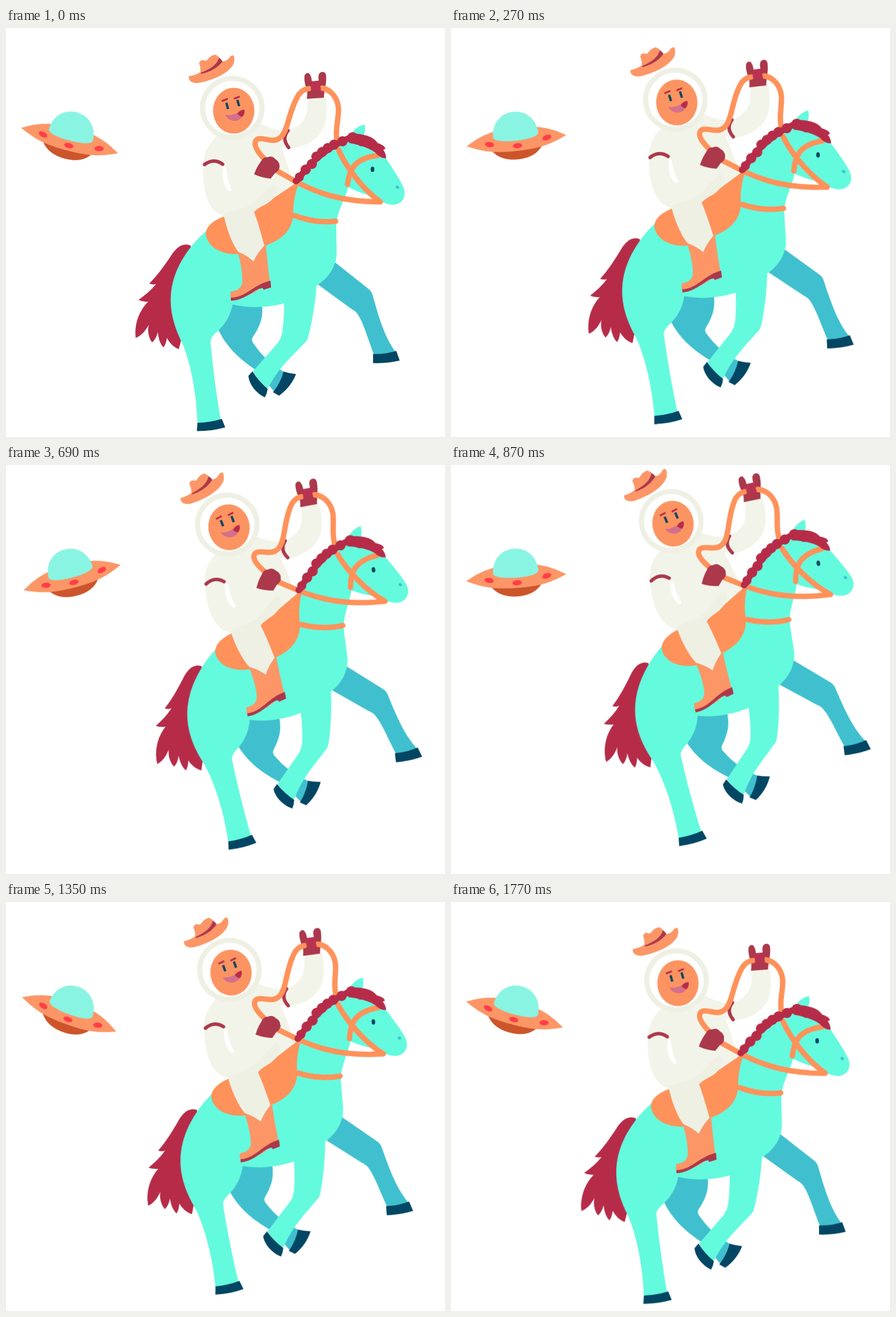
An HTML page for the animation above (1.8 s loop, 775 by 722 pixels).

```html
<!DOCTYPE html>
<html lang="en">
<head>
<meta charset="utf-8">
<title>Space rider</title>
<style>
  html, body { margin: 0; width: 100%; height: 100%; overflow: hidden; background: #fff; }
  svg { display: block; width: 100%; height: 100%; }
  #rider { transform-origin: 84px 193px; translate: -1px -0.5px; }
  .coat { fill: #64fade; }
  .far { fill: #40c0ce; }
  .navy { fill: #034663; }
  .hair { fill: #b62c48; }
  .tack { fill: #ff925a; }
  .skin { fill: #fc9666; }
  .suit { fill: #f3f4e9; }
  .pants { fill: #eef0e4; }
  .glove { fill: #ab384b; }
  .line { fill: none; stroke-linecap: round; stroke-linejoin: round; }
  .flat { fill: none; }
  .strap { stroke: #ff925a; stroke-width: 9.5; }
  .band { stroke: #ab384b; stroke-width: 6; }
</style>
</head>
<body>
<svg viewBox="0 0 775 722">
  <g id="ufo">
    <path fill="#cc552b" d="M-46 21Q-32 42 0 42Q32 42 45 21Z"/>
    <path class="skin" d="M-88.500 9C-60-8-40-14 0-14S60-8 88.500 9C60 22 40 27 0 27S-60 22-88.500 9Z"/>
    <path fill="#8af4e2" d="M-40.500-1C-39-56.500 38-56.500 40-1Q38 8.500 0 9Q-38 8.500-40.500-1Z"/>
    <g fill="#ff3d48">
      <ellipse rx="8.200" ry="4.600" transform="translate(-48 10.500) rotate(13)"/>
      <ellipse rx="8.200" ry="4.600" transform="translate(1 18)"/>
      <ellipse rx="8.200" ry="4.600" transform="translate(54 9.500) rotate(-14)"/>
    </g>
  </g>

  <g id="rider">
    <!-- tail and far legs -->
    <path class="hair" d="M326 384C311 378 300 389 292 401C280 419 268 436 253 451Q259 454 265 452C256 463 245 472 234 480Q242 484 251 483C234 500 226 525 229 547C240 543 247 533 252 524C249 537 253 549 258 555Q265 549 268 537Q270 556 278 564Q283 557 284 547Q292 562 305 567L310 548L330 450Z"/>
    <path class="far" d="M375 533L400 480L452 488C455 514 446 530 436 545Q432 551 437 557C451 578 470 596 491 607L494 625L474 643L464 630L440 603C412 584 390 564 375 533Z"/>
    <path class="navy" d="M490 606.500Q501 610 512 611Q503 634 482 649L471.500 643Q485 626 490 606.500Z"/>
    <path class="far" d="M580 413L638 459Q645 464 647 471C658 510 668 545 687 571L690 578L651 580C640 553 633 525 622 507Q618 500 610 496L551 453Z"/>
    <path class="navy" d="M648 575.500Q670 576 689 570L695 587Q672 592.500 648 591.500Z"/>

    <!-- horse -->
    <path class="coat" d="M605 195C612 180 620 174 633 170Q636 180 629 198Z"/>
    <path class="coat" d="M512 275C540 238 570 213 606 190L630 192C652 203 664 219 672 232C684 250 694 265 701 280C709 298 698 312 683 312Q669 311 660 304L655 299Q628 293 604 281C600 300 583 325 583 350C583 390 586 402 580 417C574 435 560 447 548 455C546 490 538 530 533 547Q531 553 526 557C505 580 482 598 463 635L454 636L436 606L478 558Q485 550 487 540C490 525 491 505 491 486C462 494 428 495 400 488C396 508 388 521 375 534Q361 545 361 553C365 600 372 650 379 692L379 698L338 700C337 650 327 595 312 558C290 515 289 485 292 462C298 420 325 382 357 355L440 310Z"/>
    <path class="navy" d="M435 606Q447 625 462 637Q461 645 457 652C442 645 429 629 428 614Z"/>
    <path class="navy" d="M338 697Q362 696 381 690L387 705Q362 712 337 711.500Z"/>
    <ellipse class="navy" cx="647" cy="249.500" rx="3.200" ry="4.700"/>
    <ellipse class="far" cx="691" cy="281" rx="3.200" ry="2.500" transform="rotate(40 691 281)"/>

    <!-- saddle -->
    <path class="tack" d="M387 332C360 341 349 356 354 370C361 391 386 401 412 399L458 384C486 374 506 358 507 328C507 308 510 293 518 271L480 290L440 320Z"/>
    <path class="line strap" d="M509 331Q545 345 582 341"/>

    <!-- boot -->
    <path class="skin" d="M407 390C416 415 418 440 417 450Q414 464 397 465Q395 472 397 479L432 470L466 450C463 425 460 400 459 382L430 380Z"/>
    <path class="glove" d="M397 476C424 476 436 453 467 446L468 458L455 462L453 459C438 460 425 480 397 481.500Z"/>

    <!-- suit -->
    <path class="suit" d="M375 188C355 205 348 225 348 244C346 290 358 326 386 332L440 322L507 277C500 255 494 225 480 198L452 170Z"/>
    <path class="suit" d="M448 168C468 178 484 183 497 180C520 175 532 160 532 138L534 121L564 121C568 142 567 162 560 178C548 202 520 212 497 213Q470 205 455 195Z"/>
    <path fill="#fff" d="M384 243C380 262 384 277 392 287Q398 291 398 284C392 272 389 258 389 248Z"/>
    <path class="pants" d="M384 328C388 350 398 379 410 395Q425 401 437 412Q443 398 456 384C450 362 444 340 438 325Q441 320 455 313C474 304 484 288 476 276C460 278 452 300 428 314C412 322 396 322 384 328Z"/>
    <path class="line band" d="M350.500 241Q367 229 382.500 240.500"/>
    <path class="line band" d="M498 181Q486 195 499 211"/>

    <!-- helmet and face -->
    <ellipse cx="399.500" cy="141" rx="52.500" ry="52" fill="#fff" stroke="#eef0e4" stroke-width="9"/>
    <ellipse cx="402" cy="146" rx="36.500" ry="40.500" fill="#fc9462"/>
    <path class="flat" stroke="#b62c48" stroke-width="3.200" d="M381 129L391.500 125M402.500 125L412.500 121"/>
    <path class="flat" stroke="#034663" stroke-width="4.200" d="M389 132L392 143M408.500 127L411.500 138"/>
    <path fill="#d46f8c" d="M387 153C395 156 403 152 409 150L418 153C416 160 411 164 403 164C394 163 388 158 387 153Z"/>
    <path class="hair" d="M408.500 151Q412 145 420.500 144Q423 150 417 157Q411 155 408.500 151Z"/>

    <!-- hat -->
    <path class="skin" d="M323 85C321 93 328 98 340 97C364 92 392 82 402 63Q405 50 400.500 48Q396 49 393 54C389 58 384 60 380 58Q376 49 369 47Q362 48 356 55Q354 59 349 57Q343 56 341 62Q344 70 343 78Q333 84 323 85Z"/>
    <path class="glove" d="M344 79C359 73 372 66 376 53Q380 54 382 59.500C374 70 360 78 344 81Z"/>

    <!-- hands and reins -->
    <path class="glove" d="M527 84Q530 78 535 80Q539 84 540 94L552 93Q550 80 556 78Q563 76 565 83Q566 97 563 106L561 123L531 125Q533 112 530 106Q526 95 527 84Z"/>
    <path class="line strap" d="M455 230C443 217 437 206 441 199C446 190 463 200 474 198C486 196 491 187 496 172C502 152 508 130 518 116Q526 107 535 107M558 106C575 109 586 125 587 143C587 165 581 175 584 196"/>
    <path fill="#bd3153" d="M539 97Q543 91 546 96Q551 90 554 97L556 109Q551 113 546 108Q541 113 538 108Z"/>
    <path class="line" stroke="#ab384b" stroke-width="1.500" d="M546 97L547 108"/>
    <path class="line strap" d="M478 252C515 272 560 307 661 307C630 285 600 245 587 215M603 276C606 250 615 230 656 225"/>
    <path class="glove" d="M451 234Q455 227 462 228Q470 225 475 231Q483 236 483 244Q483 252 475 256L467 266Q450 264 438 258Q441 250 445 243Z"/>

    <!-- mane -->
    <path class="line" stroke="#b62c48" stroke-width="11" d="M514 269C535 240 565 210 607 194"/>
    <path class="hair" d="M605 186Q645 186 656 203Q668 207 670 213L666 215Q671 222 671 230Q660 230 652 220Q638 209 606 203Z"/>
    <g id="braid" class="hair"></g>
  </g>
</svg>
<script>
  const $ = id => document.getElementById(id);

  // Beads of the braid, nape to crown: x, y, radius
  const beads = [
    [512, 270, 6], [518, 263, 8], [529, 250, 9], [540, 240, 9], [548, 227, 9], [558, 219, 9],
    [568, 212, 9], [579, 206, 9], [594, 200, 9], [612, 194, 10], [628, 200, 9], [640, 203, 9]
  ];
  for (const [cx, cy, r] of beads) {
    const bead = document.createElementNS($('rider').namespaceURI, 'circle');
    for (const [k, v] of Object.entries({ cx, cy, r })) bead.setAttribute(k, v);
    $('braid').append(bead);
  }

  // Swings through [ms, degrees] stops at one step per tick
  const LOOP = 1800, TICK = 30;
  function swing(el, stops, prefix = '') {
    const frames = stops.map(([ms, deg], i) => {
      const next = stops[i + 1];
      return {
        offset: ms / LOOP,
        transform: `${prefix}rotate(${deg}deg)`,
        easing: next ? `steps(${(next[0] - ms) / TICK})` : 'linear'
      };
    });
    el.animate(frames, { duration: LOOP, iterations: Infinity });
  }

  swing($('rider'), [[0, 0], [840, -7.9], [1800, -0.16]]);
  swing($('ufo'), [[0, 14.7], [510, -25.3], [1290, 20.8], [1800, 14.6]], 'translate(114.5px, 190px) ');
</script>
</body>
</html>
```
